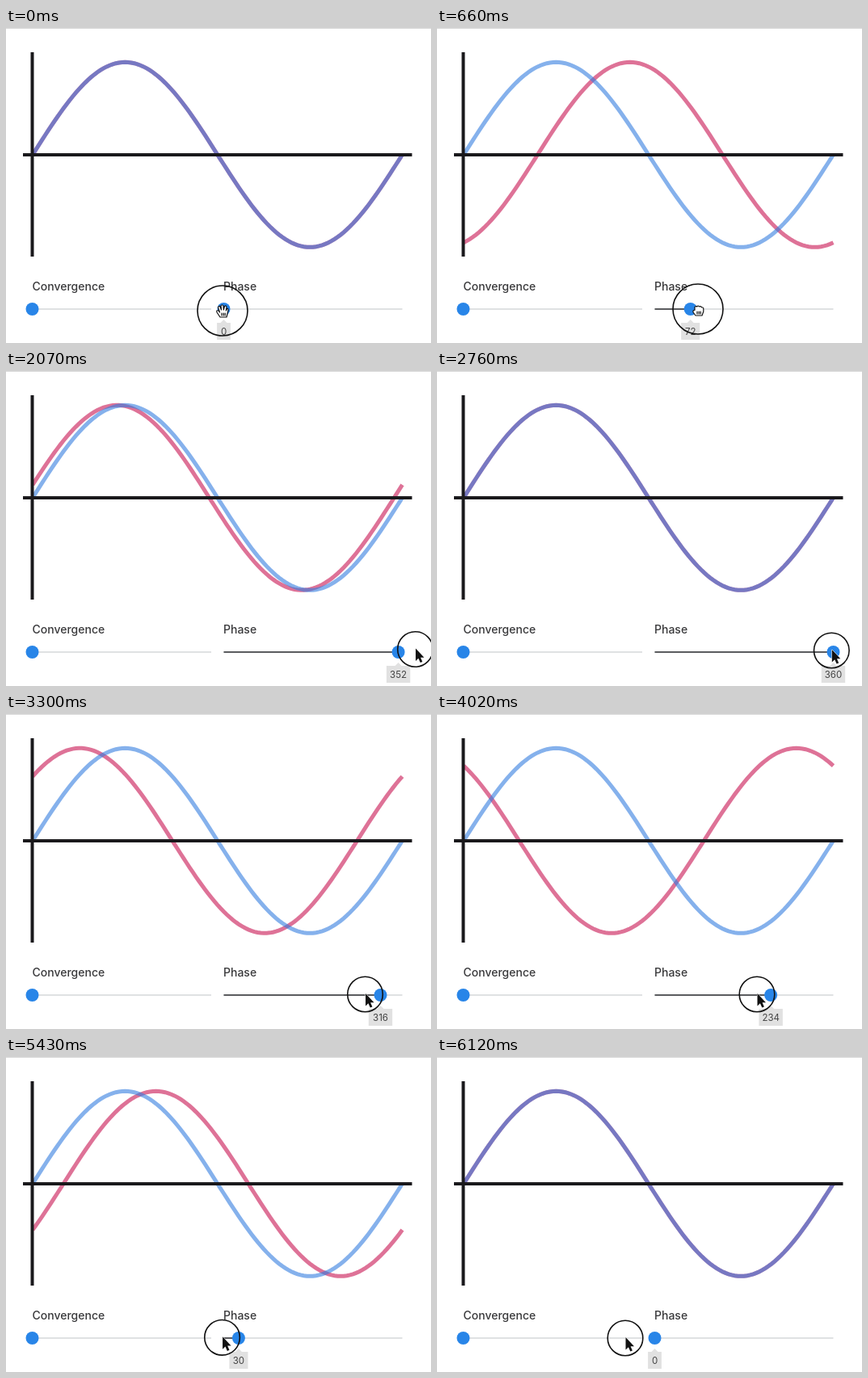
An HTML page for the animation above (6150 ms loop, 526 px wide and 390 px high).

```html
<!DOCTYPE html>
<html lang="en">
<head>
<meta charset="utf-8">
<title>Phase slider</title>
<style>
  html, body { margin: 0; width: 100%; height: 100%; overflow: hidden; background: #fff; }
  svg { display: block; width: 526px; height: 390px; font-family: Inter, Roboto, sans-serif; }
  .wave { fill: none; stroke-width: 5; opacity: .6; }
  .axis { stroke: #1a191c; stroke-width: 4; }
  .track { stroke: #dfe1e3; stroke-width: 2; }
  .name { font-size: 14px; font-weight: 500; fill: #39393b; }
  .value { font-size: 11.5px; fill: #444; text-anchor: middle; }
  .knob { fill: #2885e8; }
  .hand { fill: #fff; stroke: #111; stroke-width: 1.2; stroke-linejoin: round; stroke-linecap: round; }
</style>
</head>
<body>
<svg viewBox="0 0 526 390">
  <rect width="526" height="390" fill="#fff"/>
  <path d="M0 .5H526" stroke="#d9d9d9"/>
  <path id="shifted" class="wave" stroke="#c81452"/>
  <path id="fixed" class="wave" stroke="#347ddf"/>
  <path class="axis" d="M32.5 30V283M21 157H502.5"/>

  <text class="name" x="32.5" y="325">Convergence</text>
  <text class="name" x="269" y="325">Phase</text>
  <path class="track" d="M33 348H254M269.5 348H490.5"/>
  <path id="filled" stroke="#5b5c5f" stroke-width="2"/>
  <circle class="knob" cx="32.5" cy="348" r="8"/>
  <g id="thumb">
    <circle class="knob" cy="348" r="8"/>
    <path d="M-4.5 365.5L0 361L4.5 365.5Z" fill="#e1e1e1"/>
    <rect id="badge" y="365" height="21" fill="#e1e1e1"/>
    <text id="value" class="value" y="380.2"></text>
  </g>

  <g id="pointer">
    <circle id="ring" fill="none" stroke="#111" stroke-width="1.6"/>
    <path id="arrow" d="M.5 -1V14.4L3.9 11.2L6.3 16.6L8.9 15.4L6.6 10.2H11Z"
          fill="#111" stroke="#fff" stroke-width="1" paint-order="stroke"/>
    <g id="openHand" class="hand">
      <path d="M-3 8L-7 2Q-8 -1 -5 0L-3.5 2L-5.5 -4Q-5 -6.5 -3 -5L-1.5 -1L-2 -6Q-.5 -8.5 1 -6L1.3 -1L2.5 -5.5Q4.5 -7 5 -4.5L4.3 0L5.5 -2.5Q7.5 -3 7 -.5L5 8Z"/>
      <path d="M-1 3V6M1.2 3V6M3.2 3V6"/>
    </g>
    <g id="closedHand" class="hand">
      <path d="M-3 8L-6 4Q-6.5 1 -4 1.3V-2Q-3 -4.5 -1.3 -3Q.2 -5 1.6 -3Q3.4 -4.3 4.3 -2.2Q6.8 -2.6 6.8 0V3L5 8Z"/>
      <path d="M-1 3V6M1.2 3V6M3.2 3V6"/>
    </g>
  </g>
</svg>
<script>
const LOOP = 6150, STEP = 30;
const WAVE = { left: 33, width: 457.5, mid: 156.8, height: 114.5 };
const SLIDER = { left: 269.5, width: 221, y: 348 };

const phaseKeys = [[0, 0], [60, 0], [660, 72], [2070, 352], [2130, 360], [2920, 360],
  [3300, 316], [4020, 234], [4830, 114], [5060, 82], [5810, 0], [LOOP, 0]];
const xKeys = [[0, 268], [60, 268], [660, 323], [1920, 496], [2070, 506.5], [2250, 510],
  [2550, 501], [3070, 463.5], [3300, 444.5], [4020, 396], [4830, 320], [6120, 233], [LOOP, 233]];
const yKeys = [[0, 350], [660, 348], [2070, 344.5], [3300, 347], [4830, 347], [LOOP, 348]];
const radiusKeys = [[0, 31], [690, 31], [840, 21.8], [LOOP, 21.8]];

const $ = id => document.getElementById(id);
const set = (id, attrs) => {
  for (const name in attrs) $(id).setAttribute(name, attrs[name]);
};
const show = (id, visible) => set(id, { visibility: visible ? 'visible' : 'hidden' });

// Smooth interpolation that never overshoots its keys.
function curve(keys) {
  const rise = keys.slice(1).map(([t, v], i) => (v - keys[i][1]) / (t - keys[i][0]));
  const slope = keys.map((_, i) => {
    const a = rise[i - 1] ?? rise[0], b = rise[i] ?? a;
    return a * b > 0 ? 2 * a * b / (a + b) : 0;
  });
  return time => {
    let i = 0;
    while (i < keys.length - 2 && time >= keys[i + 1][0]) i++;
    const [t0, v0] = keys[i], [t1, v1] = keys[i + 1];
    const span = t1 - t0, u = (time - t0) / span, w = 1 - u;
    return v0 * w * w * (1 + 2 * u) + v1 * u * u * (3 - 2 * u)
      + span * u * w * (slope[i] * w - slope[i + 1] * u);
  };
}

function sinePath(degrees) {
  const points = [];
  for (let i = 0; i <= 120; i++) {
    const angle = i / 120 * 2 * Math.PI - degrees * Math.PI / 180;
    const x = WAVE.left + i / 120 * WAVE.width;
    const y = WAVE.mid - Math.sin(angle) * WAVE.height;
    points.push(x.toFixed(2) + ' ' + y.toFixed(2));
  }
  return 'M' + points.join('L');
}

const phaseAt = curve(phaseKeys), xAt = curve(xKeys), yAt = curve(yKeys), radiusAt = curve(radiusKeys);

function draw(time) {
  const phase = Math.round(phaseAt(time));
  const knobX = SLIDER.left + phase / 360 * SLIDER.width;
  const badgeWidth = 10.5 + 6.3 * String(phase).length;

  set('shifted', { d: sinePath(phase) });
  set('filled', { d: `M${SLIDER.left} ${SLIDER.y}H${knobX}` });
  set('thumb', { transform: `translate(${knobX})` });
  set('badge', { x: -badgeWidth / 2, width: badgeWidth });
  $('value').textContent = phase;

  set('pointer', { transform: `translate(${xAt(time)} ${yAt(time)})` });
  set('ring', { r: radiusAt(time) });
  show('openHand', time < 60);
  show('closedHand', time >= 60 && time < 720);
  show('arrow', time >= 720);
}

set('fixed', { d: sinePath(0) });
const start = performance.now();
function tick() {
  const elapsed = (performance.now() - start) % LOOP;
  draw(Math.floor(elapsed / STEP) * STEP);
  requestAnimationFrame(tick);
}
tick();
</script>
</body>
</html>
```
